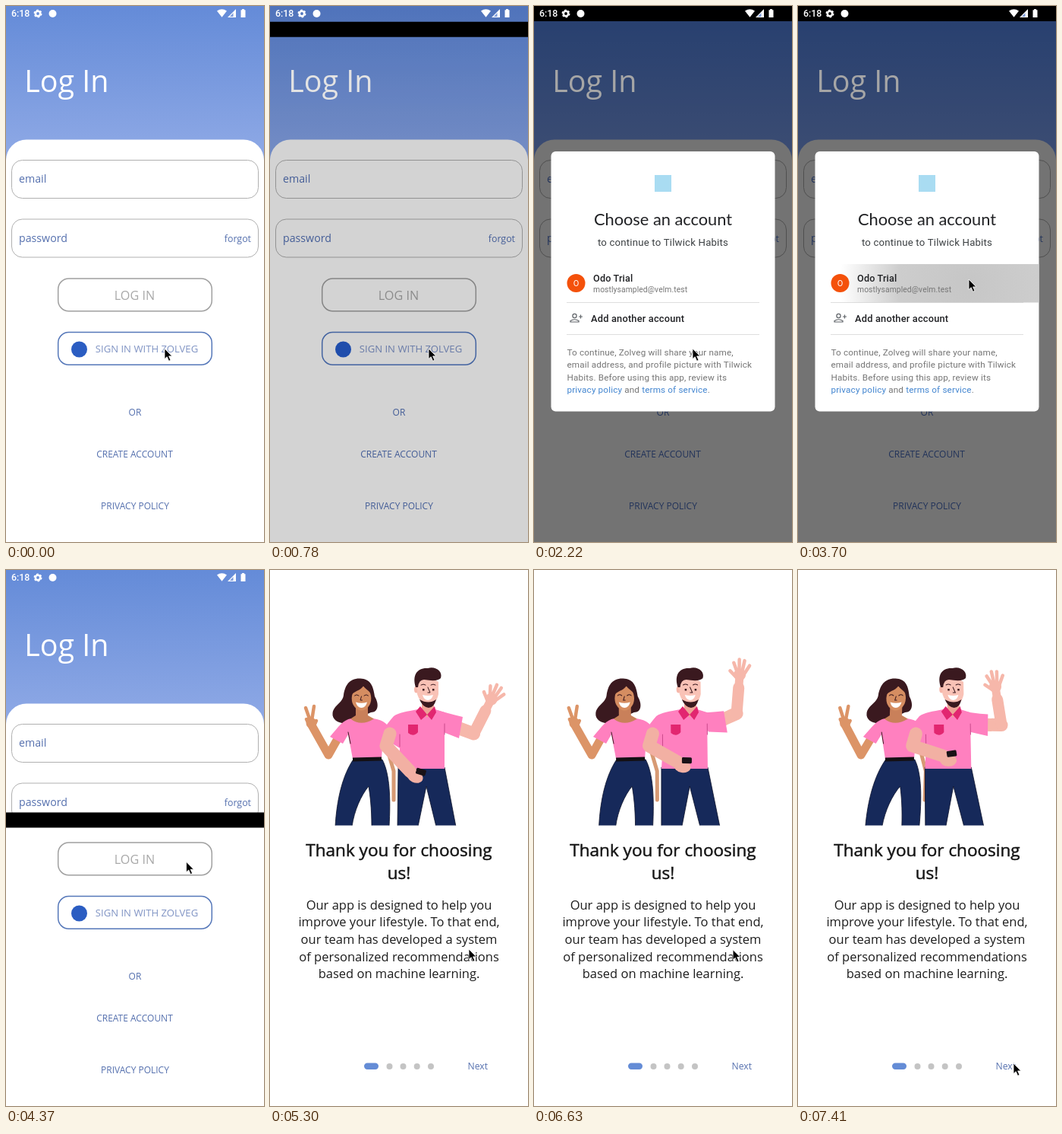
An HTML page that plays this animation: 340 by 704 pixels, repeating every 7480 ms.

```html
<!DOCTYPE html>
<html lang="en">
<head>
<meta charset="utf-8">
<title>Login flow</title>
<style>
  html, body { margin: 0; height: 100%; overflow: hidden; background: #fff; }
  svg { display: block; width: 100vw; height: 100vh; font-family: "Open Sans", sans-serif; }
  .mid { text-anchor: middle; }
  .blue { fill: #5570ae; }
  .box { fill: none; stroke: #b0b0b0; }
  .sheet { font-family: Roboto, sans-serif; fill: #202124; }
  .limb { fill: none; stroke-linecap: round; stroke-linejoin: round; }
  .pants { fill: #16295a; stroke: #0a1028; stroke-width: .8; }
  .shirt { fill: #ff80bf; }
  .dark { fill: #3a191f; }
  .ink { fill: none; stroke: #3a191f; stroke-width: 1; stroke-linecap: round; }
</style>
</head>
<body>
<svg viewBox="0 0 340 704">
  <defs>
    <linearGradient id="sky" x2="0" y2="1">
      <stop stop-color="#648bd8"/><stop offset="1" stop-color="#90aae6"/>
    </linearGradient>
    <radialGradient id="press">
      <stop stop-color="#c6c6c6"/><stop offset=".55" stop-color="#cdcdcd"/>
      <stop offset="1" stop-color="#cdcdcd" stop-opacity="0"/>
    </radialGradient>
    <clipPath id="row"><rect x="22" y="339" width="295.500" height="50.500"/></clipPath>
    <clipPath id="picture"><rect y="100" width="340" height="235.500"/></clipPath>
  </defs>

  <g id="login">
    <rect width="340" height="204" fill="url(#sky)"/>
    <rect y="175.500" width="340" height="560" rx="27" fill="#fff"/>
    <rect class="box" x="7.500" y="202.500" width="325" height="50" rx="14"/>
    <rect class="box" x="7.500" y="280" width="325" height="50" rx="14"/>
    <g class="blue" font-size="14.200">
      <text x="17" y="231.500">email</text>
      <text x="17" y="309.500">password</text>
      <text x="323" y="310" font-size="12.400" text-anchor="end">forgot</text>
    </g>
    <rect class="box" x="68.700" y="358" width="202.600" height="42.700" rx="14" style="stroke:#a0a0a0;stroke-width:1.500"/>
    <text class="mid" x="169.500" y="385.500" font-size="16.200" fill="#a8a8a8">LOG IN</text>
    <rect class="box" x="68.700" y="428.500" width="202.600" height="42.700" rx="14" style="stroke:#5577b9;stroke-width:1.500"/>
    <circle cx="96.500" cy="451" r="10.500" fill="#2b5dc2"/>
    <text class="mid" x="185.500" y="454.700" font-size="13.100" fill="#8094c4">SIGN IN WITH ZOLVEG</text>
    <g class="mid blue" font-size="12">
      <text x="170" y="537.500">OR</text>
      <text x="169.500" y="593.300">CREATE ACCOUNT</text>
      <text x="170" y="661.300">PRIVACY POLICY</text>
    </g>
  </g>
  <text id="heading" x="24.200" y="113" font-size="39.400" fill="#fff">Log In</text>

  <rect id="bar" width="340" height="20"/>

  <g id="sheet" class="sheet">
    <rect x="22.500" y="191" width="295" height="341.500" rx="6" fill="#fff"/>
    <rect x="159" y="222" width="22" height="22" fill="#a9dcf2"/>
    <text class="mid" x="170" y="288" font-size="21.800" font-family="Lato, sans-serif">Choose an account</text>
    <text class="mid" x="170" y="314.500" font-size="13.200" letter-spacing=".2" fill="#3c4043">to continue to Tilwick Habits</text>
    <path d="M43 389.500H297M43 431.500H297" stroke="#dedede"/>
    <circle id="ripple" cx="225" cy="364" fill="url(#press)" clip-path="url(#row)"/>
    <circle cx="55.500" cy="364" r="12" fill="#f4510b"/>
    <text class="mid" x="55.500" y="368" font-size="11" fill="#fff">O</text>
    <text x="78" y="361.500" font-size="12.600" font-weight="500" letter-spacing=".2">Odo Trial</text>
    <text x="78" y="376" font-size="10.300" letter-spacing=".1" fill="#757575">mostlysampled@velm.test</text>
    <g fill="none" stroke="#5f6368" stroke-width="1.200">
      <circle cx="53.500" cy="407" r="2.600"/>
      <path d="M48 415V413.500Q53.500 410 59 413.500V415ZM59 408H64M61.500 405.500V410.500"/>
    </g>
    <text x="75" y="414.500" font-size="12.800" font-weight="500" letter-spacing=".2">Add another account</text>
    <g font-size="11.700" letter-spacing=".16" fill="#757575">
      <text x="43.500" y="459">To continue, Zolveg will share your name,</text>
      <text x="43.500" y="475.300">email address, and profile picture with Tilwick</text>
      <text x="43.500" y="491.800">Habits. Before using this app, review its</text>
      <text x="43.500" y="508.300"><tspan fill="#4285d0">privacy policy</tspan> and <tspan fill="#4285d0">terms of service</tspan>.</text>
    </g>
  </g>

  <g id="welcome">
    <rect width="340" height="704" fill="#fff"/>
    <g clip-path="url(#picture)">
      <g id="woman">
        <path class="limb" d="M156 240L163 264L163 302" stroke="#d79a74" stroke-width="5"/>
        <path class="dark" d="M119 142.500C104 142 99 152 97 164C96 175 84 177 82.500 188C81 201 101 205 111 197L133 187C143 187 144 176 138 166C136 150 131 143 119 142.500Z"/>
        <path class="limb" d="M90 220L77 243L55 204" stroke="#dc9467" stroke-width="11"/>
        <path class="limb" d="M53 198L47 181M55 198L58 179M51 202L48 196M58 204L61 198" stroke="#dc9467" stroke-width="4.500"/>
        <circle cx="54.500" cy="201" r="7" fill="#dc9467"/>
        <path class="shirt" d="M107 195C96 197 91 205 79 219L96 228L103 216L109 248H147L149 219L160 214C157 203 150 197 136 195Z"/>
        <path d="M113 180V191L106 195.500Q120 206 137 195.500L129 191V180Z" fill="#c9805a"/>
        <ellipse cx="120.500" cy="168.500" rx="12.800" ry="16" fill="#d58d61"/>
        <path class="dark" d="M106 168C108 158 119 160 123 152C126 158 133 158 135 167C138 151 130 145 120 145C108 146 104 156 106 168Z"/>
        <path class="ink" d="M111.500 165Q114 162.500 117 165M124 165Q127 162.500 129.500 165M120.500 166L119 171H121.500M103 213L106 228"/>
        <path d="M113 173.500Q120.500 176 128 173.500Q126 181 120.500 181T113 173.500Z" fill="#fff"/>
        <path class="pants" d="M109 250L148 249C158 268 159 300 157 337H134C134 312 132 297 130 284C120 296 111 316 108 337H86C88 300 96 270 109 250Z"/>
        <path d="M109 249L147 248" stroke="#141014" stroke-width="5"/>
      </g>
      <g id="man">
        <path class="pants" d="M169 259H230L245 337H219L206 284L195 337H168Z"/>
        <path id="upper" class="limb" stroke="#f6b7aa" stroke-width="17"/>
        <g id="wave" class="limb" stroke="#f6b7aa">
          <path d="M0 0V-34" stroke-width="15"/>
          <path d="M0 -30V-50" stroke-width="11"/>
          <path d="M-4 -55L-9 -66M-1 -56L-2 -71M3 -56L5 -70M6 -53L12 -64M-5 -48L-13 -55" stroke-width="4.500"/>
          <circle cy="-51" r="7.500" fill="#f6b7aa"/>
        </g>
        <path id="sleeve" class="shirt" d="M217 183C228 186 240 190 254 193L249 221L226 212Z"/>
        <path class="shirt" d="M195 183C180 186 170 187 163 192C154 202 149 210 145 218L171 234L169 261H230V187L217 183Z"/>
        <path class="ink" d="M230 202V216M171 216V232" style="stroke:#c9498b"/>
        <path d="M182 203H195V213Q189 220 182 214Z" fill="#e22670"/>
        <path d="M200 170V184L207 194L216 184V170Z" fill="#eda396"/>
        <path d="M198 179L207 190L217 179L219 187L213 197L207 190L199 197L192 186Z" fill="#e22670"/>
        <ellipse cx="193" cy="157" rx="3" ry="4.500" fill="#f6b7aa"/>
        <path d="M194 147Q208 138 222 147V163Q219 177 209 177Q197 175 194 163Z" fill="#f9c2b6"/>
        <path class="dark" d="M197 170Q209 177 219 170Q216 181 209 181Q201 180 197 170ZM192 154C187 138 194 128 208 129C219 126 228 134 225 142Q221 147 203 144Q196 144 195 154Z"/>
        <path class="ink" d="M199 151Q202 149 205 151M212 151Q215 149 218 151M208 154L211 161H208"/>
        <path d="M201 156h2.500v2.500h-2.500zM214 156h2.500v2.500h-2.500z" class="dark"/>
        <path d="M201 164Q208 166 215 164Q213 171 208 171T201 164Z" fill="#fff"/>
        <path id="fold" class="limb" stroke="#f2b0a3" stroke-width="17"/>
        <g id="fist">
          <ellipse cx="1" cy="2" rx="11" ry="8" fill="#f2b0a3"/>
          <rect x="0" y="-10" width="13" height="8" rx="1.500" fill="#191216" transform="rotate(-8)"/>
        </g>
      </g>
    </g>
    <g class="mid" fill="#161616" font-size="22.500" stroke="#161616" stroke-width=".5">
      <text x="170" y="376">Thank you for choosing</text>
      <text x="170" y="406.300">us!</text>
    </g>
    <g class="mid" fill="#1c1c1c" font-size="16.500">
      <text x="170" y="445.700">Our app is designed to help you</text>
      <text x="170" y="468.300">improve your lifestyle. To that end,</text>
      <text x="170" y="490.900">our team has developed a system</text>
      <text x="170" y="513.500">of personalized recommendations</text>
      <text x="170" y="536">based on machine learning.</text>
    </g>
    <rect x="124" y="647.500" width="19" height="8.500" rx="4.200" fill="#648cd6"/>
    <path class="limb" d="M157.500 652h0M175.500 652h0M193.700 652h0M212 652h0" stroke="#c4c4c4" stroke-width="8"/>
    <text x="260.500" y="656.300" font-size="12.200" class="blue">Next</text>
  </g>

  <g id="status" fill="#fff">
    <text x="7" y="14.200" font-size="12.400" font-weight="500" font-family="Roboto, sans-serif">6:18</text>
    <circle cx="42" cy="10" r="3.200" fill="none" stroke="#fff" stroke-width="2.600"/>
    <circle cx="42" cy="10" r="4.700" fill="none" stroke="#fff" stroke-width="1.600" stroke-dasharray="2.500 2.420"/>
    <circle cx="61.500" cy="10" r="5"/>
    <path d="M278 6.500Q284.500 2 291 6.500L284.500 14.800ZM303 4V15H292ZM309.500 5.200H311V4H314V5.200H315.500V15H309.500Z"/>
    <path d="M299.500 9V14H295Z" fill="#7d9bdc"/>
  </g>

  <path id="cursor" d="M0 0V13.500L3.200 10.700L5.600 16.300L8 15.200L5.600 9.900H9.800Z" stroke="#fff" stroke-width=".8"/>
</svg>

<script>
const LOOP = 7480;
const $ = id => document.getElementById(id);
const set = (id, name, value) => $(id).setAttribute(name, value);
const smooth = x => x * x * (3 - 2 * x);
const ramp = (t, from, to) => Math.min(1, Math.max(0, (t - from) / (to - from)));

// Eased value along [time, value] pairs.
function track(t, keys) {
  let value = keys[0][1];
  for (let i = 1; i < keys.length; i++) {
    const [t0, from] = keys[i - 1], [t1, to] = keys[i];
    value += (to - from) * smooth(ramp(t, t0, t1));
  }
  return value;
}

const cursorX = [[2630, 209], [3330, 225], [4204, 225], [4630, 262], [6600, 262], [7400, 284]];
const cursorY = [[2630, 450], [3330, 359], [4277, 359], [4630, 498], [6600, 498], [7400, 648]];
const womanLean = [[5700, 0], [6250, -.7], [7250, 1]];
const manTurn = [[5700, 0], [7300, 1]];
const armAngle = [[5800, 20], [6650, -18], [6950, -18], [7450, 4]];

function drawPeople(t) {
  const lean = track(t, womanLean), turn = track(t, manTurn), angle = track(t, armAngle);
  set('woman', 'transform', `matrix(1 0 ${-.035 * lean} 1 ${14.6 * lean} 0)`);
  set('man', 'transform', `matrix(1 0 ${.02 * turn} 1 ${-6.9 * turn} 0)`);

  const rad = angle * Math.PI / 180;
  const elbowX = 230 + 41 * Math.cos(rad), elbowY = 201 + 41 * Math.sin(rad);
  set('upper', 'd', `M236 203L${elbowX} ${elbowY}`);
  set('wave', 'transform', `translate(${elbowX} ${elbowY}) rotate(${27 - 35 * turn})`);
  set('sleeve', 'transform', `rotate(${(angle - 20) / 2} 230 195)`);

  const handX = 191 + 8 * turn, handY = 269 - 21 * turn;
  set('fold', 'd', `M158 215L153 231L${handX - 6} ${handY - 4}`);
  set('fist', 'transform', `translate(${handX} ${handY}) rotate(${25 - 25 * turn})`);
}

function draw(t) {
  const closing = t >= 3890;

  // The transparent window slides in first, then the sheet's shade; closing reverses the order.
  const barY = closing ? 704 * smooth(ramp(t, 4143, 4630)) : 704 * (1 - smooth(ramp(t, 440, 820)));
  set('bar', 'y', barY);
  const shade = closing ? 1 - ramp(t, 3890, 4140) : ramp(t, 700, 960);
  $('login').style.filter = `brightness(${1 - .55 * shade}) saturate(${1 + .4 * shade})`;
  $('heading').style.filter = `brightness(${1 - .35 * shade})`;

  const shown = closing ? 1 - ramp(t, 3890, 4080) : smooth(ramp(t, 1850, 2060));
  const scale = closing ? 1 : .92 + .08 * shown;
  set('sheet', 'opacity', shown);
  set('sheet', 'transform', `translate(170 362) scale(${scale}) translate(-170 -362)`);
  set('ripple', 'r', 200 * ramp(t, 3480, 3740));

  const welcome = t >= 5300;
  set('welcome', 'visibility', welcome ? 'visible' : 'hidden');
  set('status', 'visibility', welcome ? 'hidden' : 'visible');
  drawPeople(t);
  set('cursor', 'transform', `translate(${track(t, cursorX)} ${track(t, cursorY)})`);
}

const start = performance.now();
function tick() {
  draw((performance.now() - start) % LOOP);
  requestAnimationFrame(tick);
}
tick();
</script>
</body>
</html>
```
